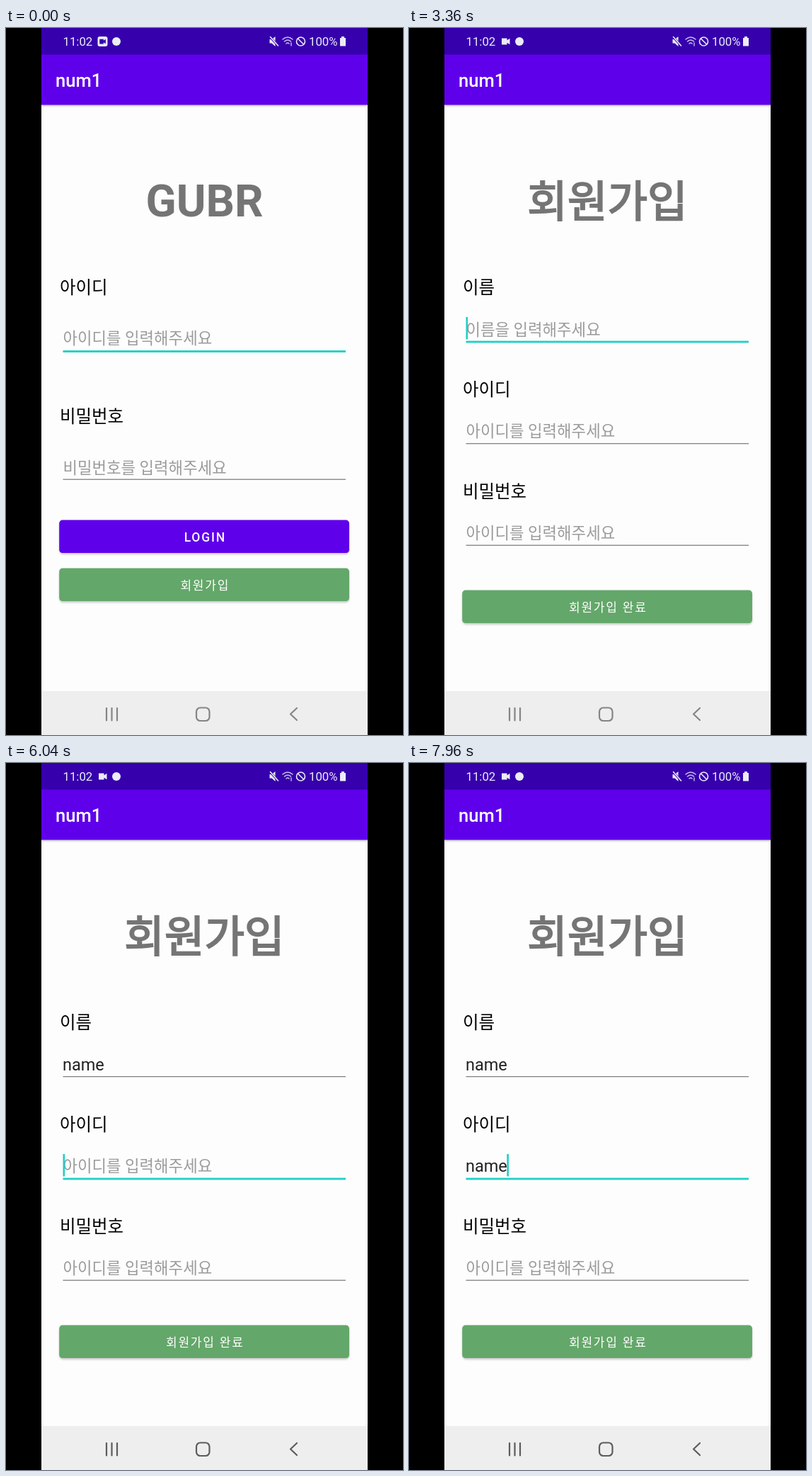
These frames come from a looping animation (561x998 px, 8000 ms). An HTML page:

```html
<!DOCTYPE html>
<html lang="ko">
<head>
<meta charset="utf-8">
<style>
html, body { margin: 0; height: 100%; overflow: hidden; background: #000; }
svg { display: block; }
#stage { width: 100vw; height: 100vh; }
text { font-family: Roboto, "Noto Sans CJK KR", "Noto Sans CJK", sans-serif; white-space: pre; }
.mid { text-anchor: middle; }
.label { font-size: 24.5px; fill: #000; }
.hint { font-size: 22.3px; fill: #9b9b9b; }
.value { font-size: 23.5px; fill: #222; }
.bar { font-size: 25.6px; font-weight: 500; fill: #fff; }
.title { fill: #757575; }
.btn { font-size: 17px; letter-spacing: 1.8px; fill: #fff; }
.line { fill: none; stroke-width: 2.2; stroke-linecap: round; stroke-linejoin: round; }
</style>
</head>
<body>
<svg id="stage" viewBox="0 0 561 998"></svg>
<script>
const LOOP = 8000, TEAL = '#1fcfc6', PURPLE = '#5f00ea', GREEN = '#64a76a';
const stage = document.getElementById('stage');
const $ = id => document.getElementById(id);
const set = (id, attrs) => { for (const k in attrs) $(id).setAttribute(k, attrs[k]); };
const clamp = v => Math.max(0, Math.min(1, v));
const ramp = (t, from, to) => clamp((t - from) / (to - from));
const easeOut = (u, power = 2) => 1 - (1 - u) ** power;
const within = (t, ...spans) => spans.some(([a, b]) => t >= a && t < b);

const rect = (x, y, w, h, fill, extra = '') =>
  `<rect x="${x}" y="${y}" width="${w}" height="${h}" fill="${fill}" ${extra}/>`;
const text = (x, y, cls, str, extra = '') =>
  `<text x="${x}" y="${y}" class="${cls}" ${extra}>${str}</text>`;

// ---- screens ----
const field = (id, label, labelY, hint, hintY, lineY) =>
  text(76, labelY + 9, 'label', label) +
  text(80.5, hintY + 8.5, 'hint', hint, `id="${id}-hint"`) +
  text(80, hintY + 8.5, 'value', '', `id="${id}-value"`) +
  rect(81, hintY + 9.8, 0, 1.4, '#6b4a3a', `id="${id}-compose"`) +
  rect(80.5, lineY - .6, 399.5, 1.2, '#777', `id="${id}-line" data-y="${lineY}"`) +
  rect(80.5, lineY - 35, 2.6, 31.5, TEAL, `id="${id}-cursor"`);

const button = (y, color, label, ripple = '', extra = '') =>
  rect(75.5, y + 2, 409.5, 46, '#000', 'rx="5" opacity=".22" filter="url(#blur)"') +
  rect(75.2, y - .4, 409.8, 46.4, color, 'rx="4.5"') +
  (ripple && `<svg x="75.2" y="${y}" width="409.8" height="46" overflow="hidden">
    <circle id="${ripple}" cx="205" cy="23" fill="#fff"/></svg>`) +
  text(281.3, y + 29.5, 'btn mid', label, extra);

const screen = (id, body) => `<g id="${id}">
  ${rect(50, 0, 461, 998, '#fdfdfd')}
  <g id="${id}-pan">
    ${rect(50, 104, 461, 6, '#000', 'opacity=".25" filter="url(#blur)"')}
    ${rect(50, 0, 461, 108.5, PURPLE)}
    ${text(70, 83, 'bar', 'num1')}${body}
  </g>
  ${rect(50, 0, 461, 37.5, '#3600ad')}${rect(50, 936, 461, 62, '#eeeeee')}</g>`;

const login = screen('login',
  text(280.5, 266, 'title mid', 'GUBR', 'font-size="63.5" font-weight="700"') +
  field('user', '아이디', 366, '아이디를 입력해주세요', 437, 456.5) +
  field('pass', '비밀번호', 548, '비밀번호를 입력해주세요', 620, 637.5) +
  button(695, PURPLE, 'LOGIN', 'ripple1', 'style="font-size:17.5px;font-weight:500"') +
  button(763, GREEN, '회원가입', 'ripple2'));

// The Korean title is a regular weight thickened by a stroke.
const signup = screen('signup',
  text(280.5, 266.5, 'title mid', '회원가입', 'font-size="61.5" stroke="#757575" stroke-width="2"') +
  field('name', '이름', 366, '이름을 입력해주세요', 425, 443) +
  field('id', '아이디', 510, '아이디를 입력해주세요', 568.7, 587) +
  field('pw', '비밀번호', 654, '아이디를 입력해주세요', 712.7, 730.5) +
  button(794, GREEN, '회원가입 완료'));

// ---- keyboard ----
const key = (x, y, w, h, label, size, base, fill = '#fdfdfd') =>
  rect(x, y + 1.6, w, h, '#c2c2c2', 'rx="6"') +
  rect(x, y, w, h, fill, `rx="6" id="key-${label}"`) +
  text(x + w / 2, base, 'mid', label, `font-size="${size}" fill="#1c1c1c"`);
const keyRow = (chars, cx, y, h, size, base) =>
  [...chars].map((c, i) => key(cx + i * 44.75 - 19, y, 38, h, c, size, base)).join('');
const DARK = '#cbcbcb';

const keyboard = `<g id="keyboard">
  ${rect(50, 565, 461, 433, '#e4e4e4')}${rect(50, 565, 461, 52, '#ebebeb')}
  <path class="line" stroke="#222" d="M81 581l-10 11l10 11"/>
  ${[475.5, 483, 490.5].map(x => `<circle cx="${x}" cy="592" r="2.4" fill="#222"/>`).join('')}
  <g id="words"></g>
  ${keyRow('1234567890', 78.5, 627, 43, 25, 658)}
  ${keyRow('qwertyuiop', 78.5, 678, 55, 28, 715)}
  ${keyRow('asdfghjkl', 101, 741, 55, 28, 778)}
  ${keyRow('zxcvbnm', 145.5, 805, 55, 28, 841)}
  ${key(60, 805, 53, 55, '', 1, 0, DARK)}${key(447, 805, 53, 55, '', 1, 0, DARK)}
  ${key(60, 868, 60, 55, '!#1', 22, 904, DARK)}${key(127, 868, 38, 55, '', 1, 0, DARK)}
  ${key(172, 868, 38, 55, ',', 28, 908)}${key(217, 868, 171, 55, 'English (US)', 15.5, 901.5)}
  ${key(395, 868, 38, 55, '.', 28, 908)}${key(440, 868, 60, 55, '', 1, 0, DARK)}
  <g class="line" stroke="#222" style="stroke-width:1.8">
    <path d="M86.5 822l10 10h-5v9.500h-10v-9.500h-5z"/>
    <path d="M461 832l7-8.500h18v17h-18zM473.500 829l6 6m0-6l-6 6"/>
    <path d="M481 886v7q0 5-5 5h-17m6-6l-6 6l6 6"/>
    <path d="M138 905l16-17" style="stroke-width:1.3"/>
  </g>
  ${text(139, 891, 'mid', '한', 'font-size="12" fill="#777"')}
  ${text(153.5, 908, 'mid', '영', 'font-size="12" fill="#222"')}
</g>`;

// ---- system icons ----
const status = `<g fill="#ececf6" font-size="16.8">
  ${text(80.5, 25, '', '11:02')}${text(428, 25, '', '100%')}
  ${rect(129.5, 12, 14, 14, '#ececf6', 'rx="3" id="camBox"')}
  <path id="cam" d="M131 14.500h7.500v2.700l4-2.500v8.600l-4-2.500v2.700h-7.500z"/>
  <circle cx="156" cy="19" r="6"/>
  <path d="M372.500 16h3l5-4v14l-5-4.500h-3z"/>
  <path d="M472 14h2v-2h4v2h2v11.500h-8z"/>
  <g class="line" stroke="#ececf6" style="stroke-width:1.6">
    <path d="M373 12.500l12 13" stroke="#3600ad" style="stroke-width:3"/><path d="M373.500 12.500l11 12.500"/>
    <path d="M391 16q7-6 14 0M393.500 19q4.500-4 9 0M396 22q2-2 4 0" opacity=".8"/>
    <path d="M403 21v4" opacity=".7"/>
    <circle cx="416.500" cy="19" r="6"/><path d="M412.500 15l8 8"/>
  </g></g>`;

const nav = `<g id="nav" class="line">
  <path d="M142 960v17.500M149.500 960v17.500M157 960v17.500"/>
  <rect x="269" y="959.500" width="18.500" height="18.500" rx="5.500"/>
  <path id="back" d=""/>
  <g id="kbIcon" style="stroke-width:2">
    <path d="M469 964h23M469 969.500h23" stroke-dasharray=".1 4.400"/>
    <path d="M469 975h.1M474 975h13M491.500 975h.1"/>
  </g></g>`;

const toast = `<g id="toast">${rect(122, 804, 316, 51, '#6e6e6e', 'rx="25.5"')}
  ${text(280, 837, 'mid', '아이디/비밀번호를 확인해주세요', 'font-size="19.6" fill="#fff"')}</g>`;

stage.innerHTML = `<defs><filter id="blur" x="-5%" y="-60%" width="110%" height="220%">
  <feGaussianBlur stdDeviation="1.5"/></filter>
  <clipPath id="phone"><rect x="50" width="461" height="998"/></clipPath></defs>
  ${rect(0, 0, 561, 998, '#000')}
  <g clip-path="url(#phone)">${login}${signup}${keyboard}${toast}${status}${nav}</g>`;

// ---- timeline ----
const WORD = 'name';
const SESSIONS = [
  { keys: [4000, 4180, 4360, 4540], show: [3430, 3710], hide: [5360, 5640], last: ['names', 'named', 'namely'] },
  { keys: [6720, 6880, 7000, 7120], show: [6240, 6520], hide: [7600, 7880], last: ['name', 'names', 'named'] },
];
const GUESSES = [[], ['no', 'not', 'now'], ['name', 'nap', 'nail'], ['name', 'names', 'named']];
const GUESS_DELAY = 150;
const count = (t, keys) => keys.filter(k => t >= k).length;

const pen = document.createElement('canvas').getContext('2d');
const width = str => { pen.font = '21.5px Roboto, sans-serif'; return pen.measureText(str).width; };

function drawField(id, value, focus, cursor, composing) {
  const y = +$(id + '-line').dataset.y;
  $(id + '-value').textContent = value;
  const w = value ? $(id + '-value').getComputedTextLength() : 0;
  set(id + '-hint', { visibility: value ? 'hidden' : 'inherit' });
  set(id + '-line', focus ? { y: y - 1.4, height: 2.8, fill: TEAL } : { y: y - .9, height: 1.2, fill: '#777' });
  set(id + '-cursor', { x: w ? 79.5 + w : 80.5, visibility: focus && cursor ? 'inherit' : 'hidden' });
  set(id + '-compose', { width: composing ? Math.max(0, w - 1) : 0 });
}

function drawRipple(id, t, start) {
  set(id, {
    r: 20 + 200 * easeOut(ramp(t, start, start + 300)),
    opacity: t < start ? 0 : .24 * (1 - ramp(t, start + 250, start + 560)),
  });
}

// Suggested words fade in letter by letter while their letters grow.
function drawWords(t, { keys, last }) {
  const n = count(t - GUESS_DELAY, keys);
  const age = n ? t - GUESS_DELAY - keys[n - 1] : 0;
  const words = n === 4 ? last : GUESSES[n];
  const scale = .82 + .18 * ramp(age, 120, 150);
  $('words').innerHTML = words.map((word, slot) => [...word].map((c, i) => {
    const k = clamp((age + slot * 15 - i * 30) / 80);
    const x = [136, 247, 362][slot] + width(word.slice(0, i)) + width(c) * (1 - scale) / 2;
    return text(x, 600, '', c, `font-size="${21.5 * scale}" fill="#222" opacity="${k}"`);
  }).join('')).join('');
}

function draw(t) {
  const open = easeOut(ramp(t, 2320, 2680), 2.17);
  set('login', { transform: `translate(0 ${-20 * open})`, visibility: open < 1 ? 'visible' : 'hidden' });
  set('signup', { transform: `translate(0 ${240 * (1 - open)})`, opacity: clamp(open * 1.72) });
  set('toast', { opacity: ramp(t, 440, 640) * (1 - ramp(t, 2640, 2840)) });
  drawRipple('ripple1', t, 240);
  drawRipple('ripple2', t, 1880);

  const raise = SESSIONS.map(s => easeOut(ramp(t, ...s.show)) * (1 - ramp(t, ...s.hide) ** 2));
  const up = Math.max(...raise);
  set('keyboard', { transform: `translate(0 ${433 * (1 - up)})`, visibility: up ? 'visible' : 'hidden' });
  set('signup-pan', { transform: `translate(0 ${-32 * raise[1]})` });

  const [first, second] = SESSIONS.map(s => WORD.slice(0, count(t, s.keys)));
  const idFocus = t >= 5900;
  drawField('user', '', true, within(t, [80, 580], [1080, 1560], [2060, 2560]));
  drawField('pass', '', false);
  drawField('name', first, t >= 3160 && !idFocus, within(t, [3160, 3660], [4000, 5040], [5540, 5900]), t < 5360);
  drawField('id', second, idFocus, within(t, [5900, 6400], [6720, LOOP]), t < 7600);
  drawField('pw', '', false);

  const session = SESSIONS[t < 6000 ? 0 : 1];
  drawWords(t, session);
  [...WORD].forEach((c, i) => {
    const k = session.keys[i];
    set('key-' + c, { fill: within(t, [k - 30, k + 100]) ? '#d6d6d6' : '#fdfdfd' });
  });

  const typing = up > .5;
  set('nav', { stroke: within(t, [1880, 3160], [5280, LOOP]) ? '#5c5c5c' : '#858585' });
  set('back', { d: typing ? 'M399 964.500l8.300 8.300l8.300-8.300' : 'M411 960l-9 8.500l9 8.500' });
  set('kbIcon', { visibility: typing ? 'visible' : 'hidden' });
  const boxed = t < 440;
  set('camBox', { visibility: boxed ? 'visible' : 'hidden' });
  set('cam', boxed
    ? { fill: '#3600ad', transform: 'translate(136.500 19) scale(.75) translate(-136.700 -19)' }
    : { fill: '#ececf6', transform: '' });
}

const begin = performance.now();
function tick() {
  draw((performance.now() - begin) % LOOP);
  requestAnimationFrame(tick);
}
tick();
</script>
</body>
</html>
```
